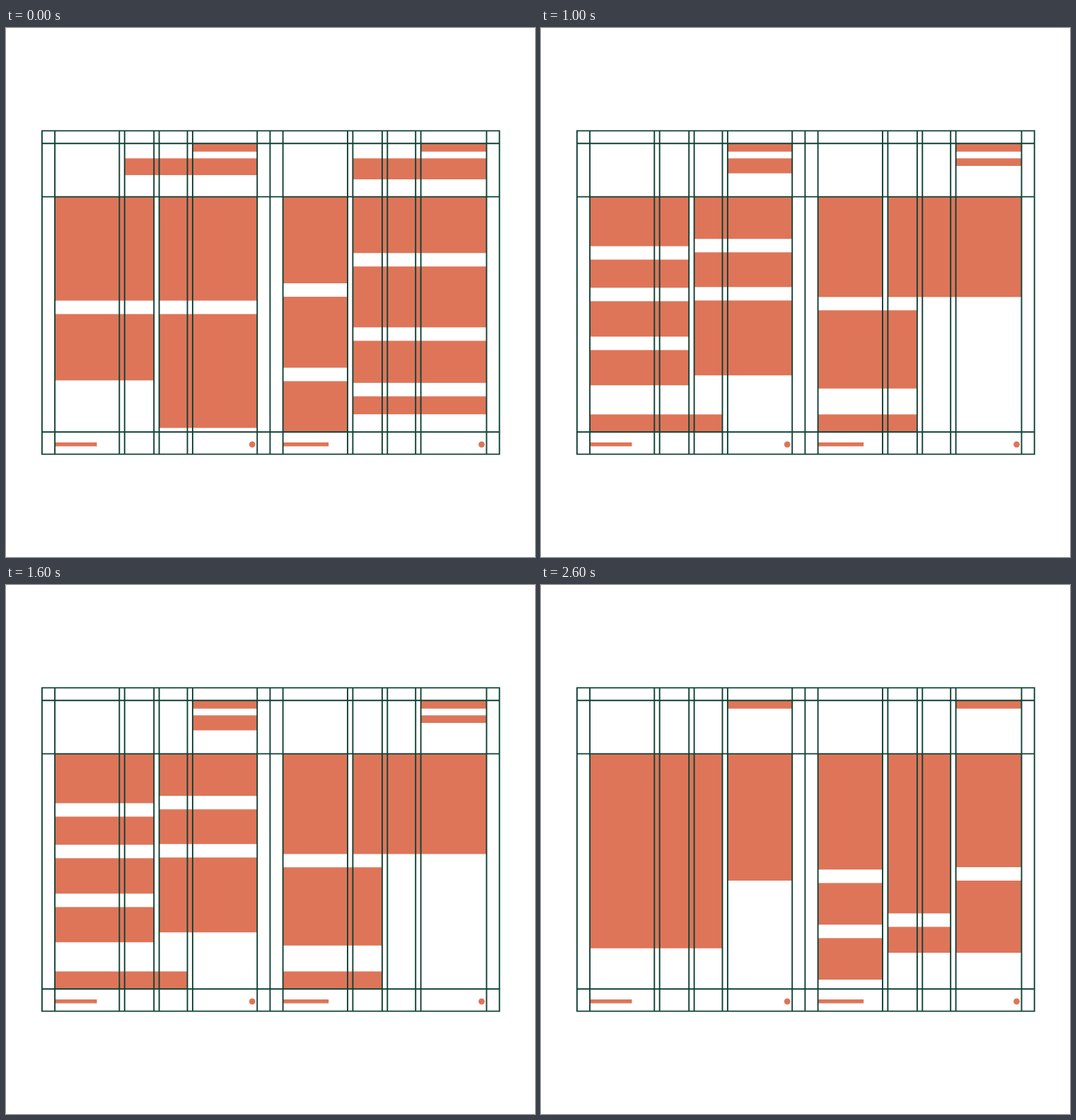
An HTML page for the animation above (3000 ms loop, 748 by 748 pixels).

```html
<!DOCTYPE html>
<html lang="en">
<head>
<meta charset="utf-8">
<title>Layout grid</title>
<style>
  html, body { margin: 0; width: 100%; height: 100%; overflow: hidden; background: #fff; }
  svg { display: block; width: 100%; height: 100%; }
  .fill { fill: #de7559; }
  .grid { fill: none; stroke: #0f4135; stroke-width: 1.9; }
</style>
</head>
<body>
<svg viewBox="0 0 748 748">
  <g class="fill" id="blocks"></g>
  <path class="grid" id="grid"/>
</svg>
<script>
const HOLD = 1000;
const MARGIN = 18.2, GUTTER = 7.4, GAP = 19;
const LEFT = 50.9, TOP = 145.4, HEAD = 163.3, BODY = 238.6, FOOT = 571.3, BOTTOM = 602.6;
const TITLE = 184.3;

// Columns of a page, each with its left and right edge
function makePage(x, widths) {
  let left = x + MARGIN;
  const cols = widths.map(w => {
    const col = { left, right: left + w };
    left += w + GUTTER;
    return col;
  });
  return { cols, end: left - GUTTER + MARGIN };
}

const verso = makePage(LEFT, [91.2, 41.5, 39.9, 91.3]);
const recto = makePage(verso.end, [91.4, 41.5, 39.9, 92.9]);
const spread = [verso, recto];

const blocks = document.getElementById('blocks');

function add(parent, tag, attrs) {
  const el = document.createElementNS('http://www.w3.org/2000/svg', tag);
  for (const k in attrs) el.setAttribute(k, attrs[k]);
  return parent.appendChild(el);
}

function box(parent, x, y, right, bottom) {
  add(parent, 'rect', { x, y, width: right - x, height: bottom - y });
}

// Blocks over columns from..to, flowing down with an even gap
function stack(page, from, to, bottoms, top = BODY) {
  return g => {
    let y = top;
    for (const bottom of bottoms) {
      box(g, page.cols[from].left, y, page.cols[to].right, bottom);
      y = bottom + GAP;
    }
  };
}

const layouts = [
  [
    stack(verso, 1, 3, [208], TITLE),
    stack(verso, 0, 1, [385.5, 498.3]),
    stack(verso, 2, 3, [385.5, 565.5]),
    stack(recto, 1, 3, [214], TITLE),
    stack(recto, 0, 0, [361, 480.4, FOOT]),
    stack(recto, 1, 3, [318.2, 423.3, 501.8, 546.2])
  ],
  [
    stack(verso, 3, 3, [205.5], TITLE),
    stack(verso, 0, 1, [308.5, 367.3, 436.4, 505.2]),
    stack(verso, 0, 2, [FOOT], 546.4),
    stack(verso, 2, 3, [298.2, 366.3, 491.2]),
    stack(recto, 3, 3, [195], TITLE),
    stack(recto, 0, 0, [380.4]),
    stack(recto, 1, 3, [380.4]),
    stack(recto, 0, 1, [509.8], 399.2),
    stack(recto, 0, 1, [FOOT], 546.4)
  ],
  [
    stack(verso, 0, 2, [513.7]),
    stack(verso, 3, 3, [418]),
    stack(recto, 0, 0, [402.4, 480.3, 558]),
    stack(recto, 1, 2, [464.4, 520]),
    stack(recto, 3, 3, [399, 520])
  ]
];

// Running header and footer
for (const page of spread) {
  const first = page.cols[0], last = page.cols[3];
  box(blocks, last.left, HEAD, last.right, 174.8);
  box(blocks, first.left, 586, first.left + (page === verso ? 59.4 : 64.6), 591.5);
  add(blocks, 'circle', { cx: last.right - 7, cy: 588.8, r: 4.4 });
}

const views = layouts.map(stacks => {
  const g = add(blocks, 'g', {});
  stacks.forEach(fill => fill(g));
  return g;
});

const xs = [verso.end];
for (const page of spread)
  for (const col of page.cols) xs.push(col.left, col.right);

document.getElementById('grid').setAttribute('d',
  `M${LEFT} ${TOP}H${recto.end}V${BOTTOM}H${LEFT}Z` +
  xs.map(x => `M${x} ${TOP}V${BOTTOM}`).join('') +
  [HEAD, BODY, FOOT].map(y => `M${LEFT} ${y}H${recto.end}`).join(''));

const start = performance.now();
function draw() {
  const step = Math.floor((performance.now() - start) / HOLD) % views.length;
  views.forEach((v, i) => v.setAttribute('visibility', i === step ? 'visible' : 'hidden'));
  requestAnimationFrame(draw);
}
draw();
</script>
</body>
</html>
```
